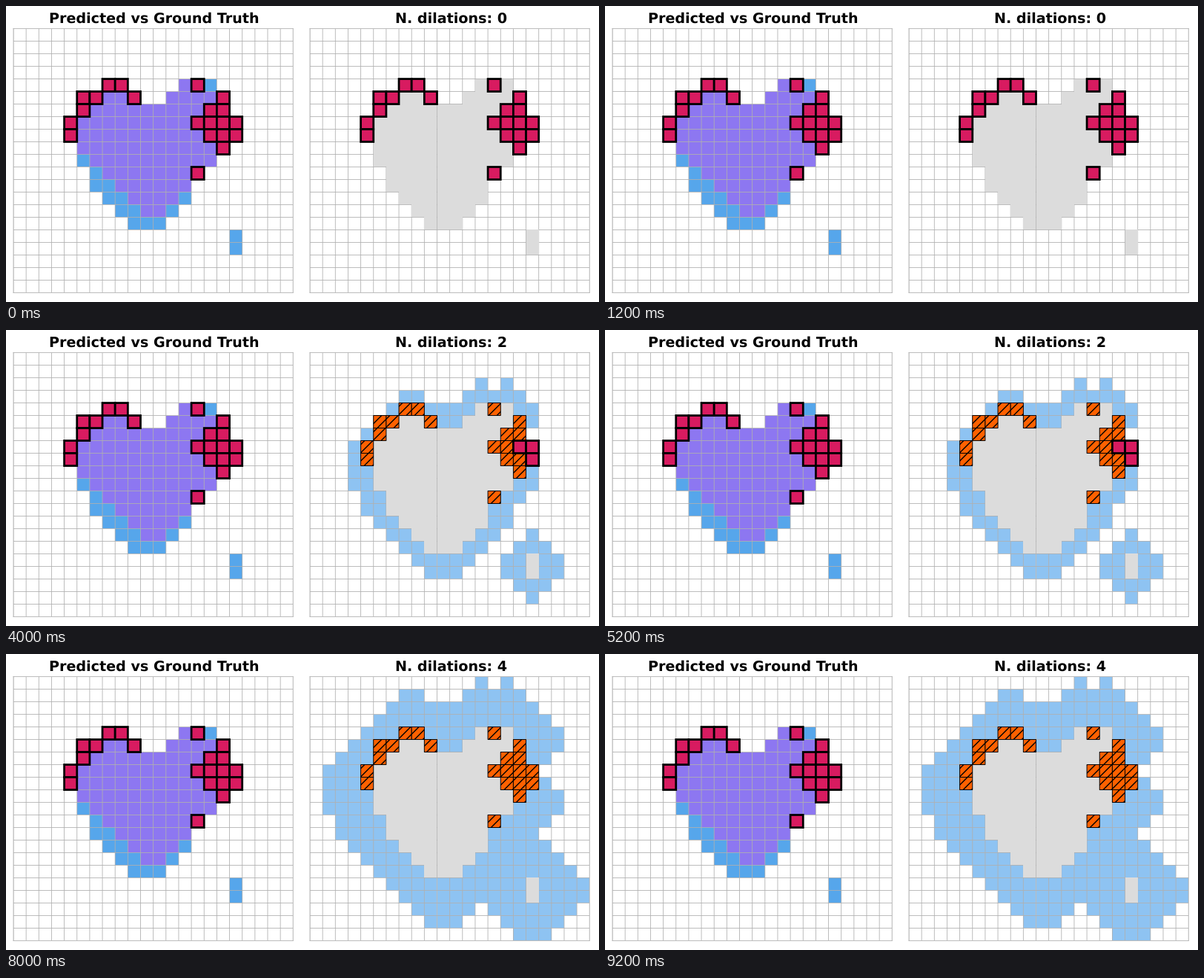
Recreate the animation shown at these times as a matplotlib script. Size 800 px wide and 400 px high, loop 10 s.

```python
import matplotlib.pyplot as plt
import numpy as np
from matplotlib.animation import FuncAnimation
from matplotlib.patches import Rectangle

W, H, DPI = 800, 400, 100
COLS, ROWS = 22, 21
STEPS = 5

LINE, GREY = "#b0b0b0", "#dcdcdc"
PURPLE, BLUE, PALE = "#8d77f1", "#56a6eb", "#8ec3f2"
PINK, ORANGE = "#d81b60", "#fe6100"

plt.rcParams["text.hinting"] = "none"

y, x = np.mgrid[:ROWS, :COLS]


def make_heart():
    """Two round lobes above a triangle, symmetric about the middle column."""
    u = abs(x - 10.5)
    lobes = (u - 3.2) ** 2 + (y - 7.5) ** 2 <= 13
    return (u + y <= 14.5) & (lobes | (y > 7))


def make_prediction():
    """A lopsided heart with diamond bites taken out, plus a stray blob."""
    v = abs(x - 10)
    peaks = (abs(x - 7.5) < y - 4) | (abs(x - 14) < 1.2 * (y - 3))
    top = (x + y >= 12) & ((y > 5) | peaks)
    bottom = (v <= 5) & (v <= 14.85 - 0.9 * y) & (y < 16)
    shape = top & bottom
    for cx, cy, size in [(16, 7, 2), (14, 4, 0), (14.5, 11.5, 1)]:
        shape &= abs(x - cx) + abs(y - cy) > size
    return shape | ((x == 17) & (abs(y - 16.5) < 1))


def dilate(m):
    p = np.pad(m, 1)
    return m | p[:-2, 1:-1] | p[2:, 1:-1] | p[1:-1, :-2] | p[1:-1, 2:]


truth, predicted = make_heart(), make_prediction()
missed = truth & ~predicted
grown = [predicted]
for _ in range(STEPS - 1):
    grown.append(dilate(grown[-1]))

fig = plt.figure(figsize=(W / DPI, H / DPI), dpi=DPI, facecolor="white")


def make_axes(left):
    ax = fig.add_axes([left / W, 12.6 / H, 377.3 / W, 356.8 / H])
    ax.set(xlim=(0, COLS), ylim=(ROWS, 0),
           xticks=range(COLS + 1), yticks=range(ROWS + 1))
    ax.tick_params(length=0, labelbottom=False, labelleft=False)
    ax.grid(color=LINE, lw=0.6, snap=False)
    for spine in ax.spines.values():
        spine.set(color=LINE, lw=0.6, snap=False, zorder=1.5)
    return ax


def paint(ax, m, color, **style):
    style = {"lw": 0, "zorder": 1, **style}
    return [ax.add_patch(Rectangle((c, r), 1, 1, fc=color, **style))
            for r, c in np.argwhere(m)]


def paint_missed(ax, m):
    return paint(ax, m, PINK, ec="black", lw=2, snap=False, zorder=4)


def title(ax, text):
    ax.set_title(text, x=0.504, fontsize=13.8, fontweight="bold",
                 fontfamily="DejaVu Sans", pad=6)


left, right = make_axes(10), make_axes(410)
title(left, "Predicted vs Ground Truth")
paint(left, predicted & truth, PURPLE)
paint(left, predicted & ~truth, BLUE)
paint_missed(left, missed)
paint(right, predicted, GREY, zorder=2)

cells = []


def update(i):
    while cells:
        cells.pop().remove()
    title(right, f"N. dilations: {i}")
    cover = grown[i]
    cells.extend(paint(right, cover & ~predicted & ~missed, PALE))
    cells.extend(paint(right, cover & missed, ORANGE, ec="black", lw=0.7,
                       hatch="///", snap=False, zorder=3))
    cells.extend(paint_missed(right, missed & ~cover))
    return cells


anim = FuncAnimation(fig, update, frames=STEPS, init_func=lambda: update(0),
                     interval=2000, repeat=True, repeat_delay=0, blit=False)
plt.show()
```
